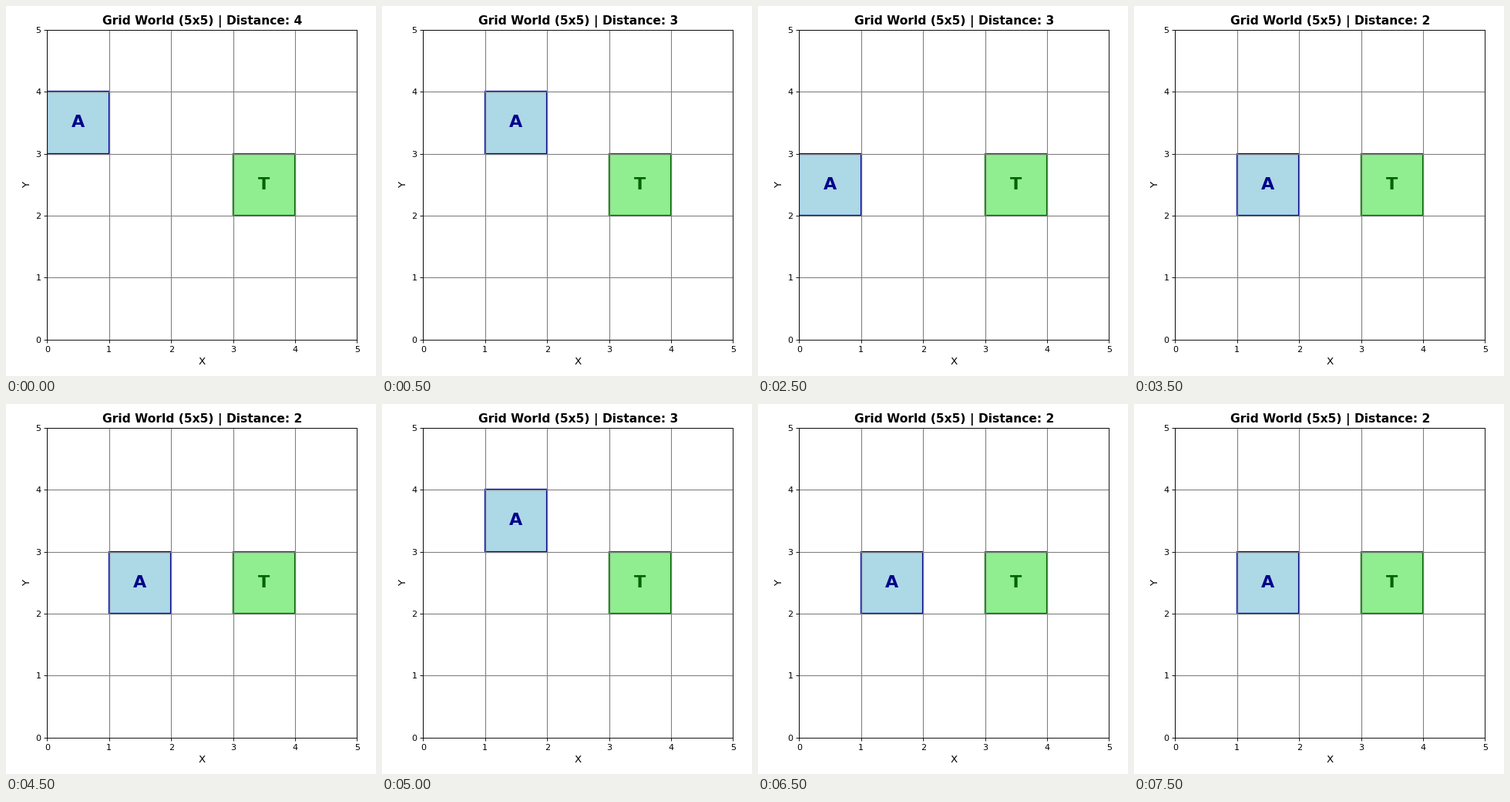
Recreate the animation shown at these times as a matplotlib script. Size 480 by 480 pixels, loop 8 s.

```python
import matplotlib.pyplot as plt
from matplotlib.animation import FuncAnimation
from matplotlib.patches import Rectangle

SIZE = 5
STEP_MS = 500
START = (0, 3)
TARGET = (3, 2)
MOVES = {"L": (-1, 0), "R": (1, 0), "U": (0, 1), "D": (0, -1)}
WALK = "RLLLDLRLRUUDDUD"  # moves into a wall leave the agent in place


def clamp(v):
    return min(max(v, 0), SIZE - 1)


def walk_path():
    x, y = START
    path = [(x, y)]
    for move in WALK:
        dx, dy = MOVES[move]
        x, y = clamp(x + dx), clamp(y + dy)
        path.append((x, y))
    return path


def add_tile(cell, letter, face, edge):
    x, y = cell
    tile = ax.add_patch(Rectangle(cell, 1, 1, facecolor=face, edgecolor=edge,
                                  linewidth=2))
    label = ax.text(x + 0.5, y + 0.5, letter, ha="center", va="center",
                    fontsize=20, fontweight="bold", color=edge)
    return tile, label


plt.rcParams["font.family"] = "DejaVu Sans"
path = walk_path()

fig, ax = plt.subplots(figsize=(6, 6), dpi=80)
ax.set_xlim(0, SIZE)
ax.set_ylim(0, SIZE)
ax.set_aspect("equal")
ax.set_xticks(range(SIZE + 1))
ax.set_yticks(range(SIZE + 1))
ax.grid(True, color="gray", linewidth=1)
ax.set_xlabel("X", fontsize=12)
ax.set_ylabel("Y", fontsize=12)

add_tile(TARGET, "T", "lightgreen", "darkgreen")
agent, agent_label = add_tile(START, "A", "lightblue", "darkblue")
title = ax.set_title("Grid World", fontsize=14, fontweight="bold")


def update(i):
    x, y = path[i]
    agent.set_xy((x, y))
    agent_label.set_position((x + 0.5, y + 0.5))
    dist = abs(x - TARGET[0]) + abs(y - TARGET[1])
    title.set_text(f"Grid World ({SIZE}x{SIZE}) | Distance: {dist}")
    return agent, agent_label, title


update(0)
fig.tight_layout()

anim = FuncAnimation(fig, update, frames=len(path), interval=STEP_MS,
                     init_func=lambda: update(0), repeat=True, blit=False)
plt.show()
```
